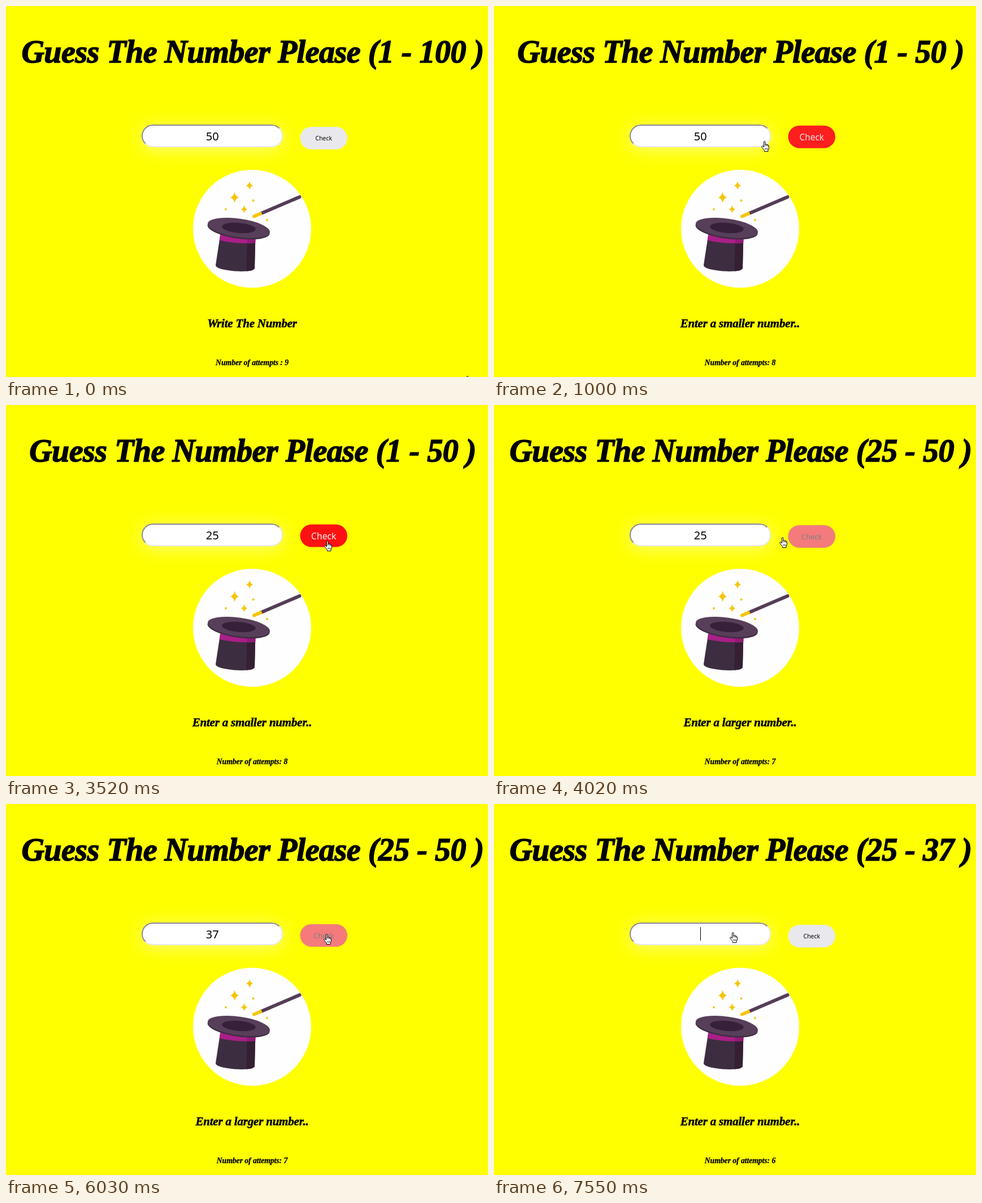
Animation, 853 px wide and 657 px high, one loop 8 s. Source, as an HTML page:

```html
<!DOCTYPE html>
<html lang="en">
<head>
<meta charset="utf-8">
<title>Guess the number</title>
<style>
html, body { margin: 0; width: 100%; height: 100%; overflow: hidden; background: #ff0; }
#field {
  position: absolute; left: 240px; top: 210px; width: 250px; height: 40px; box-sizing: border-box;
  border: 2px solid; border-color: #8b8899 #e8e8f0 #e8e8f0 #8b8899; border-radius: 20px;
  background: #fff; box-shadow: 0 4px 30px rgba(255, 255, 255, .5);
}
svg { position: absolute; left: 0; top: 0; }
text { text-anchor: middle; }
.script { font: italic bold 56px "Liberation Serif", serif; letter-spacing: -.5px; stroke: #000; stroke-width: 1.5; }
#status { font-size: 21px; letter-spacing: -.2px; stroke-width: .5; }
#attempts { font-size: 13.8px; letter-spacing: -.1px; stroke-width: .25; }
#guess { font: 20px "Noto Sans", sans-serif; }
#label { font-family: "Noto Sans", sans-serif; }
</style>
</head>
<body>
<div id="field"></div>
<svg width="853" height="657" viewBox="0 0 853 657">
  <defs>
    <path id="star" d="M0-10Q1.5-1.5 8 0Q1.5 1.5 0 10Q-1.5 1.5-8 0Q-1.5-1.5 0-10Z"/>
    <clipPath id="crown"><path id="crownShape" d="M380 400L371 459Q371 466 404 469.500Q439 471.500 440 464L441.500 405Z"/></clipPath>
  </defs>
  <text id="title" class="script" x="436.500" y="99.500"></text>

  <circle cx="435.500" cy="394.500" r="104.500" fill="#fefefe"/>
  <g fill="#f6c50c">
    <use href="#star" transform="translate(431 318) scale(.8)"/>
    <use href="#star" transform="translate(404.500 339)"/>
    <use href="#star" transform="translate(421.500 360) scale(.75)"/>
    <circle cx="437.500" cy="344.500" r="2.100"/>
    <circle cx="389" cy="360" r="1.900"/>
    <circle cx="462" cy="379" r="1.900"/>
  </g>
  <g fill="none" stroke-width="6" stroke-linecap="round">
    <path d="M451 367.500L519.500 338.200" stroke="#543d57"/>
    <path d="M439 372.500L449.500 368" stroke="#f6c50c"/>
    <path d="M449.500 368L452.500 366.700" stroke="#f6c50c" stroke-linecap="butt"/>
  </g>
  <g clip-path="url(#crown)">
    <rect x="365" y="395" width="80" height="80" fill="#3d2d40"/>
    <path d="M427 395H445V475H425.500Z" fill="#341f33"/>
    <path d="M365 400H445V419.500Q408 423 365 412Z" fill="#aa1f88"/>
    <path d="M427 400H445V419.500L426.500 420.500Z" fill="#941a75"/>
  </g>
  <g transform="translate(412 393) rotate(8)">
    <ellipse cy="2.500" rx="55.500" ry="16.500" fill="#3d2d40"/>
    <ellipse rx="55.500" ry="16.500" fill="#573e59"/>
    <ellipse rx="30" ry="9" transform="rotate(-3)" fill="#37213a"/>
  </g>

  <g id="button">
    <rect id="pill" x="520.500" y="214" width="83.500" height="40" rx="20"/>
    <text id="label" x="562.300">Check</text>
  </g>
  <text id="guess" x="365.200" y="238"></text>
  <path id="caret" d="M365.500 218V242" stroke="#000"/>
  <text id="status" class="script" x="435.500" y="568.500"></text>
  <text id="attempts" class="script" x="435.500" y="635.500"></text>
  <g id="hand" stroke="#000" stroke-linejoin="round">
    <path fill="#fff" d="M4.500 11V2Q4.500.5 5.700.5T7 2V7Q7 5.500 8.400 5.500T9.700 7.500Q9.700 6 11 6.300T12 8Q13.500 7.500 13.500 9.500V13L12 16V18.500H5.500V16.500L1 11Q0 9.200 1.500 8.700Q3 8.500 4.500 11Z"/>
    <path fill="none" stroke-width=".8" d="M7 6.500V9.500M9.700 7V9.500M12 8V10M7 12.500V15.500M9 12.500V15.500M11 12.500V15.500"/>
  </g>
</svg>
<script>
const $ = id => document.getElementById(id);
const LOOP = 8000;
const write = 'Write The Number', smaller = 'Enter a smaller number..', larger = 'Enter a larger number..';

// start, range, guess ("|" is the caret), status, attempts, hover amount, hand left, hand top
const steps = [
  [0,    '1 - 100', '50', write,   ' : 9', 0,   811, 655],
  [500,  '1 - 100', '50', write,   ' : 9', .97, 563, 236],
  [1000, '1 - 50',  '50', smaller, ': 8',  .91, 473, 239],
  [1500, '1 - 50',  '50', smaller, ': 8',  0,   414, 230],
  [2000, '1 - 50',  '|',  smaller, ': 8',  0,   414, 230],
  [2500, '1 - 50',  '',   smaller, ': 8',  0,   414, 230],
  [3000, '1 - 50',  '2',  smaller, ': 8',  0,   414, 230],
  [3520, '1 - 50',  '25', smaller, ': 8',  .97, 563, 240],
  [4020, '25 - 50', '25', larger,  ': 7',  .5,  505, 234],
  [4520, '25 - 50', '|',  larger,  ': 7',  0,   434, 231],
  [5020, '25 - 50', '',   larger,  ': 7',  0,   434, 231],
  [5530, '25 - 50', '3',  larger,  ': 7',  0,   434, 231],
  [6030, '25 - 50', '37', larger,  ': 7',  .5,  562, 230],
  [6540, '25 - 37', '37', smaller, ': 6',  1,   562, 230],
  [7050, '25 - 37', '37', smaller, ': 6',  0,   418, 228],
  [7550, '25 - 37', '|',  smaller, ': 6',  0,   417, 227]
];

const mix = (from, to, p) => `rgb(${from.map((v, i) => Math.round(v + (to[i] - v) * p))})`;

function drawButton(p) {
  $('button').setAttribute('transform', `translate(0 ${-2.5 * p})`);
  $('pill').setAttribute('fill', mix([233, 233, 237], [255, 10, 10], p));
  const label = $('label');
  label.setAttribute('fill', mix([0, 0, 0], [255, 255, 255], p));
  label.setAttribute('y', 238 + 2 * p);
  label.style.fontSize = 10.4 + 5.5 * p + 'px';
}

let shown;
function frame(now) {
  const t = now % LOOP;
  const step = steps.findLast(s => s[0] <= t);
  if (step !== shown) {
    shown = step;
    const [, range, guess, status, attempts, hover, x, y] = step;
    $('title').textContent = `Guess The Number Please (${range} )`;
    $('guess').textContent = guess === '|' ? '' : guess;
    $('caret').style.display = guess === '|' ? '' : 'none';
    $('status').textContent = status;
    $('attempts').textContent = 'Number of attempts' + attempts;
    $('hand').setAttribute('transform', `translate(${x} ${y})`);
    drawButton(hover);
  }
  requestAnimationFrame(frame);
}
frame(0);
</script>
</body>
</html>
```
